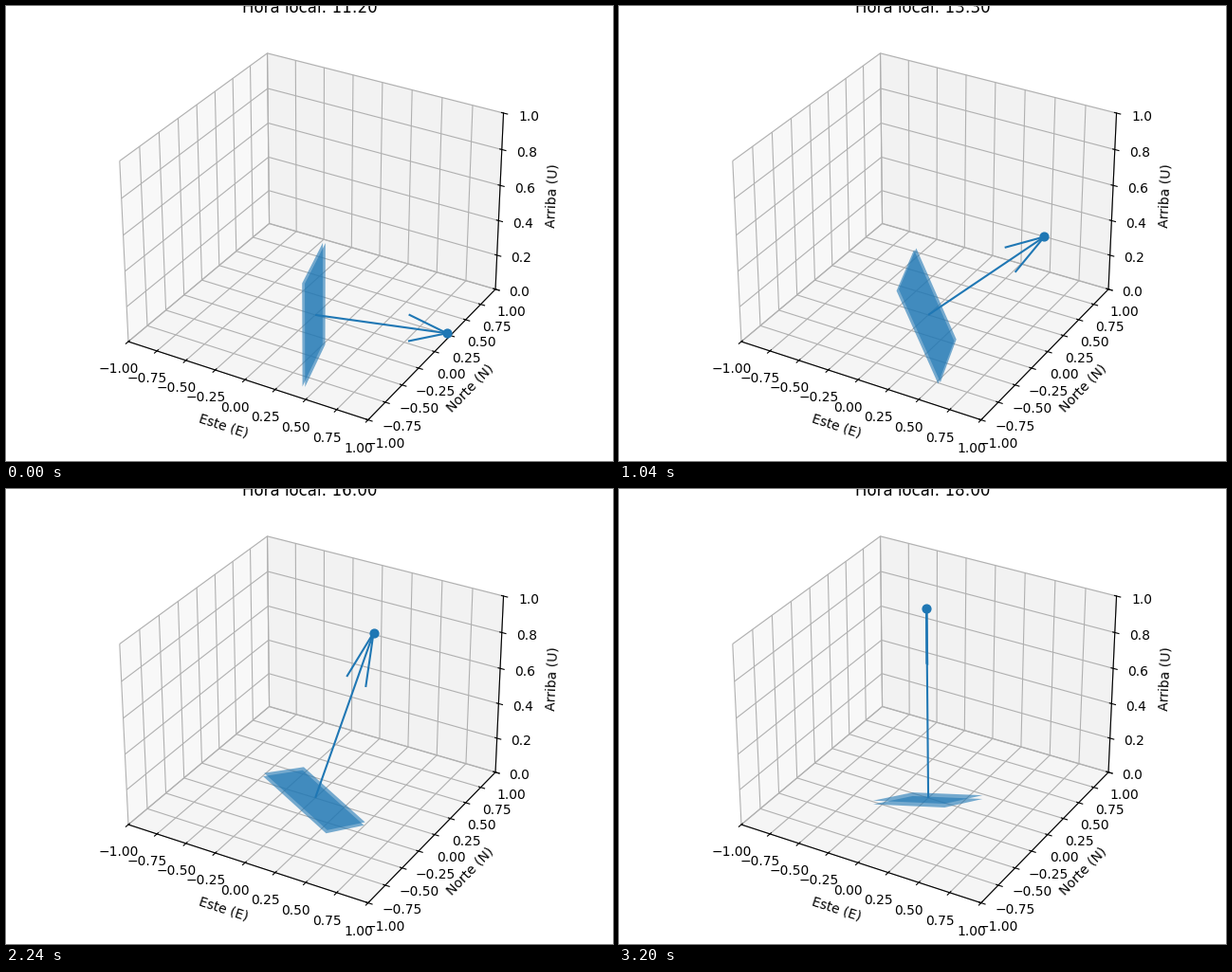
Write a matplotlib script that moves like this. It is 640 by 480 pixels and loops after 3.28 s.

```python
import numpy as np
import matplotlib.pyplot as plt
from matplotlib.animation import FuncAnimation
from mpl_toolkits.mplot3d.art3d import Poly3DCollection

FRAMES, INTERVAL = 41, 80
START, STEP = 11 * 60 + 20, 10      # clock in minutes
NORTH = 0.265                       # sine of the solar declination
HALF, THICK = 0.3, 0.02             # panel half side and thickness

fig = plt.figure(figsize=(6.4, 4.8), dpi=100)
ax = fig.add_subplot(projection="3d")
fig.subplots_adjust(left=15 / 640, right=625 / 640,
                    bottom=15 / 480, top=465 / 480)
ax.set_xlim(-1, 1)
ax.set_ylim(-1, 1)
ax.set_zlim(0, 1)
ax.set_xlabel("Este (E)")
ax.set_ylabel("Norte (N)")
ax.set_zlabel("Arriba (U)")

artists = []


def sun_vector(minutes):
    """Unit vector (E, N, U) at an equatorial site, sunrise at START."""
    hour_angle = np.radians((minutes - START) / 4 - 90)
    r = np.sqrt(1 - NORTH ** 2)
    return np.array([-r * np.sin(hour_angle), NORTH, r * np.cos(hour_angle)])


def panel_faces(n):
    """Front and back squares of a thin panel facing n."""
    ref = [0, 0, 1] if n[2] < 0.9 else [1, 0, 0]
    a = np.cross(ref, n)
    a /= np.linalg.norm(a)
    b = np.cross(n, a)
    front = HALF * np.array([a + b, a - b, -a - b, b - a])
    return [front, front - THICK * n]


def update(i):
    while artists:
        artists.pop().remove()
    minutes = START + STEP * i
    sun = sun_vector(minutes)
    panel = Poly3DCollection(panel_faces(sun), facecolors="C0",
                             alpha=0.6, linewidths=0)
    ax.add_collection3d(panel)
    arrow = ax.quiver(0, 0, 0, *sun, color="C0")
    tip = ax.scatter(*sun[:, None], s=40, color="C0", depthshade=False)
    artists.extend([panel, arrow, tip])
    ax.set_title(f"Hora local: {minutes // 60:02d}:{minutes % 60:02d}")
    return artists


anim = FuncAnimation(fig, update, frames=FRAMES, init_func=lambda: [],
                     interval=INTERVAL, repeat=True, repeat_delay=0,
                     blit=False)
plt.show()
```
